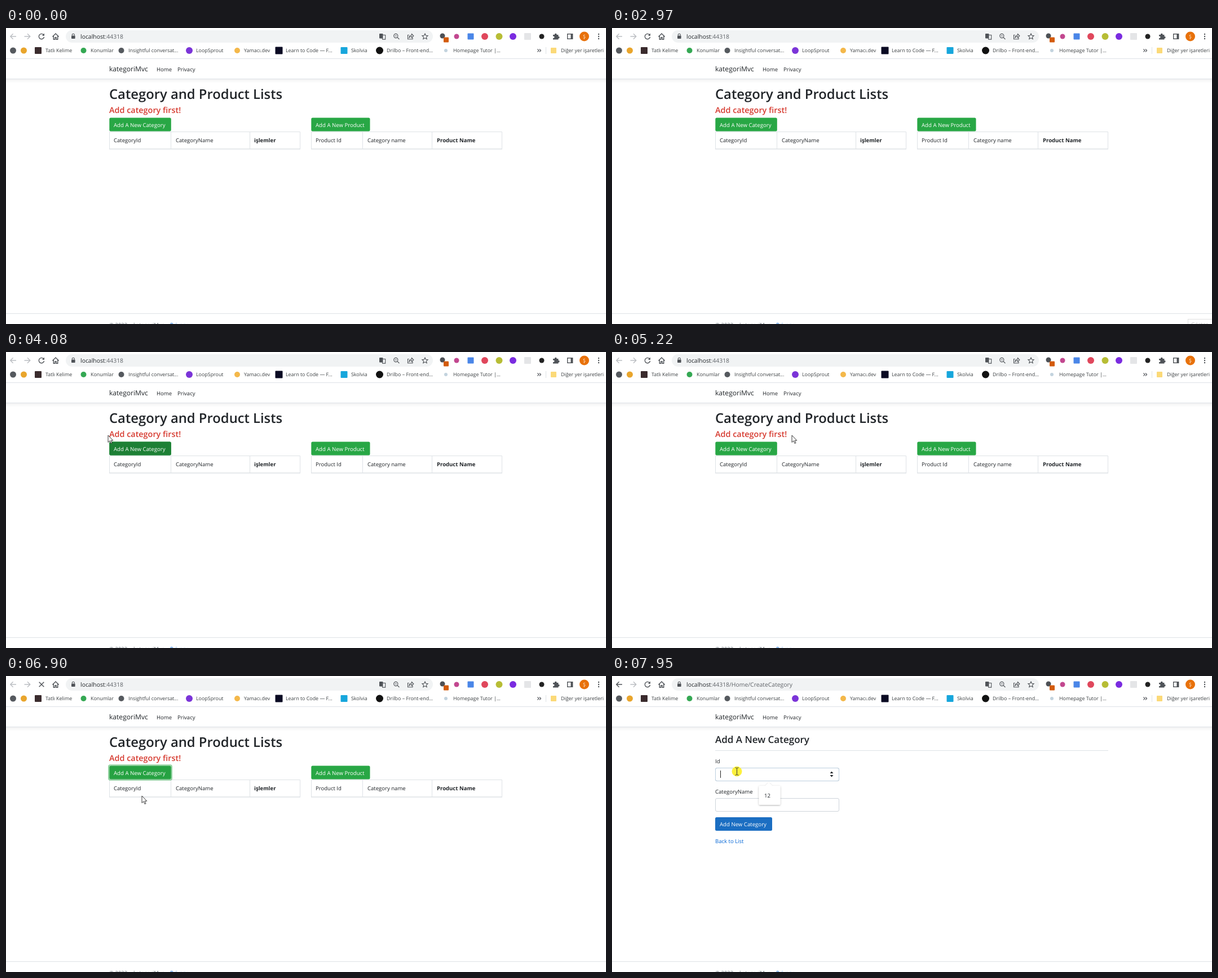
An HTML page that plays this animation: 1064x526 px, repeating every 8000 ms.

```html
<!DOCTYPE html>
<html lang="en">
<head>
<meta charset="utf-8">
<title>Category and Product Lists</title>
<style>
  html, body { margin: 0; width: 100%; height: 100%; overflow: hidden; background: #fff; }
  svg { display: block; font: 9.55px "Open Sans", "Noto Sans", sans-serif; text-rendering: geometricPrecision; }
  .marks { font-size: 8.9px; fill: #3c4043; }
  .icon { fill: none; stroke: #4f5358; stroke-width: 1.4; }
  .thin { stroke-width: 1.1; }
  .line { fill: none; stroke: #dee2e6; }
  .field { fill: #fff; stroke: #ced4da; }
  .label { font-size: 9.65px; font-weight: 500; fill: #fff; }
  .semi { font-weight: 600; }
  .bold { font-weight: 700; }
  .cursor { fill: #fff; stroke: #222; stroke-width: .9; stroke-linejoin: round; }
</style>
</head>
<body>
<svg width="1064" height="526" viewBox="0 0 1064 526" fill="#212529">
  <defs>
    <filter id="soft" x="-50%" y="-50%" width="200%" height="200%">
      <feDropShadow dx="0" dy="1" stdDeviation="1.5" flood-opacity=".3"/>
    </filter>
    <linearGradient id="shade" x2="0" y2="1">
      <stop stop-opacity=".05"/><stop offset="1" stop-opacity="0"/>
    </linearGradient>
  </defs>
  <rect width="1064" height="526" fill="#fff"/>

  <!-- browser toolbar -->
  <rect x="106" y="4" width="651" height="22" rx="11" fill="#f1f3f4"/>
  <g class="icon">
    <path id="back" d="M18 15H8M12.6 10.2 7.8 15l4.8 4.8"/>
    <path d="M32.5 15h10M38 10.2l4.8 4.8-4.8 4.8" stroke="#bbbec2"/>
    <g id="reload">
      <path d="M66.4 11.8A4.7 4.7 0 1 0 67.6 16"/>
      <path d="M68 9.6v4.2h-4.2z" fill="#4f5358" stroke="none"/>
    </g>
    <path id="stop" d="m58.7 10.7 8.6 8.6m0-8.6-8.6 8.6"/>
    <path d="M82.4 15.4 88 10l5.6 5.4M84.3 14v6.2h2.6v-3.6h2.2v3.6h2.6V14"/>
    <path d="M117.3 13.5v-1.3a2 2 0 0 1 4 0v1.3" class="thin"/>
    <path d="M666.5 12.5h6.2v7.6h-5z" class="thin"/>
    <circle cx="691.3" cy="14" r="3.6" class="thin"/>
    <path d="m694 16.7 3.4 3.3M689.6 14h3.4" class="thin"/>
    <path d="M714.5 12.5h-2v7.3h8.5v-2.6M714.8 17q.5-4 4.7-4.2v-2.2l3.4 3.4-3.4 3.3V15q-2.7 0-4.7 2z" class="thin"/>
    <path d="m743 10 1.5 3.3 3.6.4-2.7 2.4.8 3.6-3.2-1.9-3.2 1.9.8-3.6-2.7-2.4 3.6-.4z" class="thin"/>
    <rect x="995.7" y="10.7" width="9" height="8.6"/>
  </g>
  <g fill="#4f5358">
    <rect x="116" y="13.5" width="6.6" height="5.5" rx=".8"/>
    <rect x="662" y="10" width="6.5" height="8.5" rx="1"/>
    <path d="M970 12h3a1.8 1.8 0 1 1 3.5 0h3v3.2a1.7 1.7 0 1 1 0 3.3v2H970v-2.7a1.7 1.7 0 1 0 0-3z"/>
    <path d="M1001.5 10.5h3.2v9h-3.2z"/>
    <circle cx="1051" cy="11" r="1.2"/><circle cx="1051" cy="15" r="1.2"/><circle cx="1051" cy="19" r="1.2"/>
  </g>
  <g id="addons"></g>
  <circle cx="1025.5" cy="15" r="8.5" fill="#e8710a"/>
  <text x="1025.5" y="18" font-size="8" fill="#fff" text-anchor="middle">Ş</text>
  <text x="132" y="19" font-size="10.4">localhost<tspan fill="#5f6368">:44318<tspan id="path">/Home/CreateCategory</tspan></tspan></text>

  <!-- bookmarks -->
  <g id="favicons"></g>
  <g class="marks">
    <text x="70" y="43.3">Tatlı Kelime</text>
    <text x="150" y="43.3">Konumlar</text>
    <text x="217" y="43.3">Insightful conversat...</text>
    <text x="337" y="43.3">LoopSprout</text>
    <text x="422" y="43.3">Yamacı.dev</text>
    <text x="496" y="43.3">Learn to Code — F...</text>
    <text x="612" y="43.3">Skolvia</text>
    <text x="675" y="43.3">Drilbo – Front-end...</text>
    <text x="793" y="43.3">Homepage Tutor |...</text>
    <text x="984" y="43.3">Diğer yer işaretleri</text>
  </g>
  <path class="icon thin" d="m942.5 37.5 2.5 2.5-2.5 2.5m3.5-5 2.5 2.5-2.5 2.5"/>
  <path class="line" d="M957.5 34v12M0 54.5h1064M0 90.5h1064M0 507.5h1064"/>
  <rect y="91" width="1064" height="7" fill="url(#shade)"/>

  <!-- site header and footer -->
  <text x="183" y="77" font-size="12.1">kategoriMvc</text>
  <text x="267" y="77">Home</text>
  <text x="304" y="77">Privacy</text>
  <g fill="#6c757d">
    <text x="183" y="530.5">© 2022 -</text>
    <text x="226" y="530.5">kategoriMvc -</text>
    <text x="291" y="530.5" fill="#0366d6">Privacy</text>
  </g>

  <g id="list">
    <text x="183" y="126" font-size="23.8" class="semi">Category and Product Lists</text>
    <text x="183" y="150.7" font-size="14.4" class="semi" fill="#d63a2f">Add category first!</text>
    <path class="line" d="M183.5 215V184.5h338V215M292.5 184v31M432.5 184v31M541.5 215V184.5h338V215M632.5 184v31M755.5 184v31"/>
    <path class="line" d="M183 215h339M541 215h339" stroke-width="1.5"/>
    <rect id="ring" x="182" y="158.3" width="112" height="26.4" rx="3" fill="none" stroke="#28a745" stroke-opacity=".5" stroke-width="2"/>
    <rect x="183.3" y="159.4" width="109.5" height="24.2" rx="2.5" fill="#28a745"/>
    <rect id="dark" x="183.3" y="159.4" width="109.5" height="24.2" rx="2.5" fill="#1e8035"/>
    <rect x="541.3" y="159.4" width="104.2" height="24.2" rx="2.5" fill="#28a745"/>
    <text class="label" x="191" y="175.7">Add A New Category</text>
    <text class="label" x="549" y="175.7">Add A New Product</text>
    <text x="191" y="203.3">CategoryId</text>
    <text x="301" y="203.3">CategoryName</text>
    <text x="440" y="203.3" class="bold">işlemler</text>
    <text x="549" y="203.3">Product Id</text>
    <text x="641" y="203.3">Category name</text>
    <text x="764" y="203.3" class="bold">Product Name</text>
  </g>

  <g id="create">
    <text x="183" y="118.8" font-size="17" class="semi">Add A New Category</text>
    <path class="line" d="M183 132.5h697"/>
    <text x="183" y="154.5">Id</text>
    <rect class="field" x="183.5" y="163.5" width="219" height="23" rx="2.5"/>
    <path id="spin" d="m386.5 173 3-3.5 3 3.5zm0 3h6l-3 3.5z"/>
    <text x="183" y="208.7">CategoryName</text>
    <rect class="field" x="183.5" y="217.5" width="219" height="23" rx="2.5"/>
    <rect x="183" y="251" width="101" height="24" rx="2.5" fill="#1b6ec2"/>
    <text class="label" x="191" y="267">Add New Category</text>
    <text x="183" y="296.7" fill="#0366d6">Back to List</text>
    <g id="hint">
      <rect x="183.5" y="163.5" width="219" height="23" rx="2.5" fill="none" stroke="#bccfdf"/>
      <path d="M192.5 168v13" stroke="#222"/>
      <path d="M262.5 195H272l6-6 6 6h12.5q2 0 2 2v30q0 2-2 2h-34q-2 0-2-2v-30q0-2 2-2z" fill="#fff" filter="url(#soft)"/>
      <text x="270" y="215.5">12</text>
    </g>
  </g>

  <g id="tip">
    <rect x="1021.5" y="517.5" width="50" height="20" fill="#fff" stroke="#e0e0e0"/>
    <text x="1027" y="530" fill="#c4c4c4">Göster</text>
  </g>
  <g id="pointer">
    <circle id="click" r="9" fill="#fdf03c"/>
    <path id="arrow" class="cursor" d="M0 0v12.5l3-2.7 2 4.7 2-.9L5 9.2h3.8z"/>
    <path id="hand" class="cursor" d="M-1.3 1.3a1.3 1.3 0 0 1 2.6 0V6l4 1q1.7.5 1.5 2.2l-.8 4-1 3.8h-6.2L-4.6 11.2q-.8-1.5.4-1.9l2.9 1.6z"/>
    <path id="beam" d="M-3-6.5h2l1 1 1-1h2M0-5.5v11M-3 6.5h2l1-1 1 1h2" fill="none" stroke="#333"/>
  </g>
</svg>
<script>
const $ = id => document.getElementById(id);
const show = (id, on) => $(id).style.display = on ? "" : "none";

// Plain icons: centre x, centre y, half size, colour, square?
const dots = list => list.map(([x, y, r, color, square]) =>
  `<rect x="${x - r}" y="${y - r}" width="${2 * r}" height="${2 * r}" rx="${square ? 1 : r}" fill="${color}"/>`).join("");
$("addons").innerHTML = dots([
  [774, 14, 4.5, "#4d5156"], [780.5, 21, 4.5, "#d35b0b", 1], [799, 15, 4.5, "#c2478f"],
  [824, 15, 5.5, "#4a86e8", 1], [849, 15, 6, "#e0475c"], [874.5, 15, 6, "#b7bd35"],
  [899, 15, 6, "#7a2be0"], [925, 15, 6, "#e4e5e7", 1], [950, 15, 4.5, "#222"]]);
$("favicons").innerHTML = dots([
  [12.5, 40, 5.5, "#55595e"], [31.5, 40, 5.5, "#e9a52c"], [57, 40, 6, "#3a2b2d", 1],
  [137.5, 40, 5, "#34a853"], [204.5, 40, 5, "#55595e"], [325, 40, 6, "#7b34d8"],
  [410, 40, 5, "#f4b84a"], [484, 40, 6.5, "#0a0a23", 1], [599.5, 40, 6, "#17a6dc", 1],
  [662.5, 40, 6.5, "#111"], [780, 40, 3, "#c3d3de"], [971, 40, 5, "#fbd978", 1]]);

// Pointer path: time, x, y
const route = [
  [1110, 1050, 521], [1180, 1070, 530], [3040, 1070, 530], [3740, 212, 185],
  [3810, 210, 179], [4080, 181, 148], [4550, 228, 148], [4620, 236, 148],
  [4820, 319, 148], [5220, 319, 148], [5570, 265, 174], [6570, 265, 174],
  [6900, 241, 213], [7490, 240, 213], [7810, 221.5, 169.5], [8000, 221.5, 169.5]];
const FRAME = 70, LOOP = 8000, LOADED = 7100;

const ramp = (t, from, to) => Math.min(1, Math.max(0, (t - from) / (to - from)));
const within = (v, low, high) => v >= low && v < high;

function pointerAt(t) {
  const i = route.findIndex(p => p[0] > t);
  if (i < 1) return [1070, 530];
  const [t0, x0, y0] = route[i - 1], [t1, x1, y1] = route[i];
  const u = ramp(t0 + Math.floor((t - t0) / FRAME) * FRAME, t0, t1);
  const e = u * u * (3 - 2 * u);
  return [x0 + (x1 - x0) * e, y0 + (y1 - y0) * e];
}

function pointerKind(x, y, created) {
  if (created) return within(x, 183, 403) && (within(y, 163, 187) || within(y, 217, 241)) ? "beam" : "arrow";
  if (within(x, 183, 293) && within(y, 159, 184)) return "hand";
  return within(x, 183, 311) && within(y, 139, 156) ? "beam" : "arrow";
}

function draw(t) {
  const created = t >= LOADED, loading = within(t, 6570, LOADED);
  const [x, y] = pointerAt(t), kind = pointerKind(x, y, created);
  show("list", !created);
  show("create", created);
  show("path", created);
  show("reload", !loading);
  show("stop", loading);
  show("ring", t >= 6500);
  show("hint", t >= 7950);
  show("spin", created && kind === "beam" && y < 187);
  show("tip", within(t, 2970, 3110));
  show("click", within(t, 6500, 6640) || t >= 7950);
  for (const id of ["arrow", "hand", "beam"]) show(id, id === kind);
  $("back").style.stroke = created ? "#4f5358" : "#bbbec2";
  $("dark").style.opacity = ramp(t, 3780, 3880) - ramp(t, 4080, 4220) + ramp(t, 5350, 5500) - ramp(t, 6770, 6920);
  $("pointer").setAttribute("transform", `translate(${x} ${y})`);
}

const start = performance.now();
function tick() {
  draw((performance.now() - start) % LOOP);
  requestAnimationFrame(tick);
}
tick();
</script>
</body>
</html>
```
